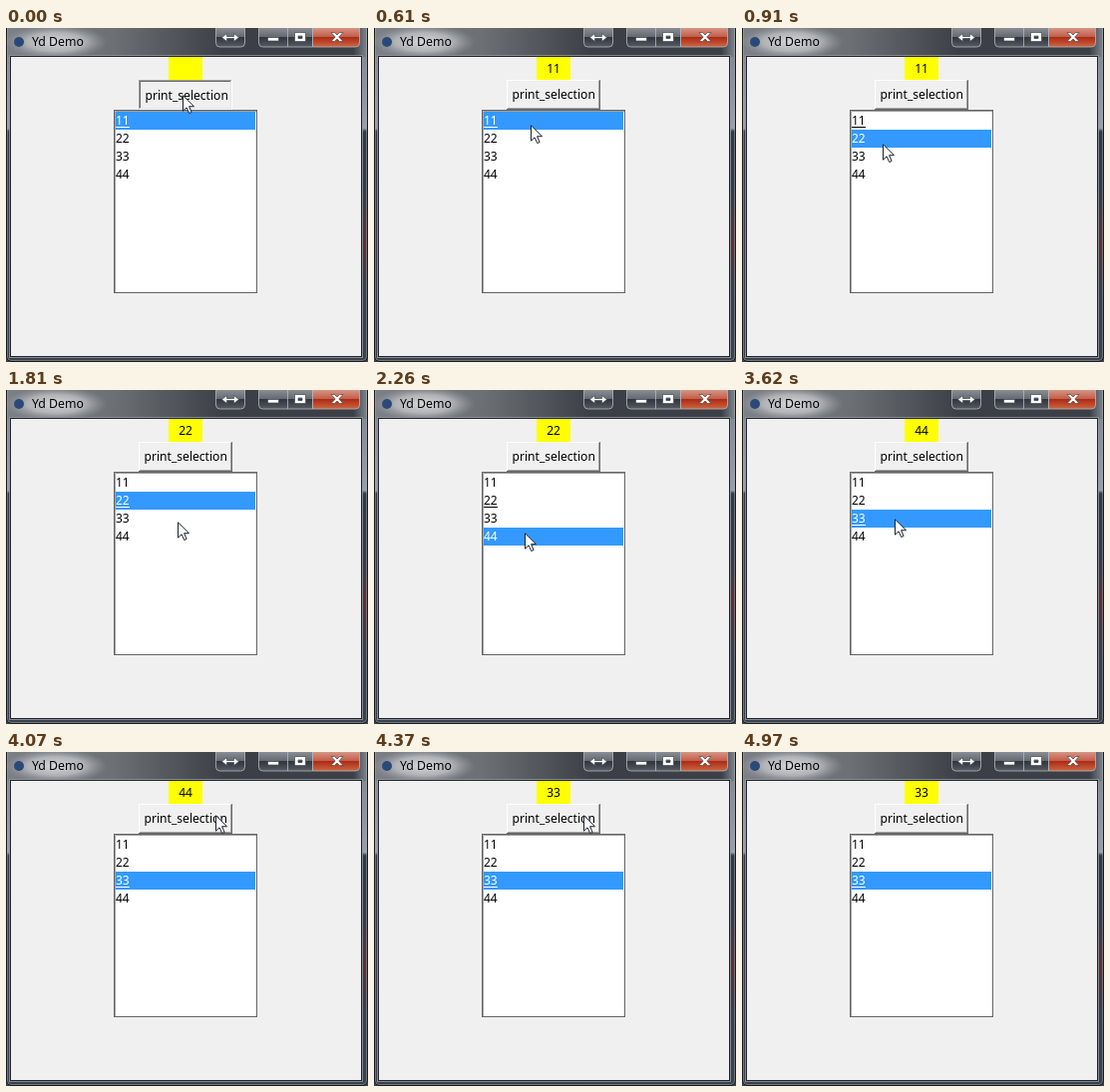
Animation, 363 px wide and 335 px high, one loop 5120 ms. Source, as an HTML page:

```html
<!DOCTYPE html>
<html lang="en">
<head>
<meta charset="utf-8">
<title>Listbox demo</title>
<style>
  html, body { margin: 0; width: 100%; height: 100%; overflow: hidden; }
  svg { display: block; width: 363px; height: 335px; font: 12px "Noto Sans", "Open Sans", sans-serif; }

  /* row: selected line, act: underlined line, lab: label entry */
  #app {
    --row: 0; --act: 0; --lab: 0;
    animation: row 5120ms step-end infinite, act 5120ms step-end infinite, lab 5120ms step-end infinite;
  }
  .row { transform: translateY(calc(var(--row) * 18px)); }
  .back { transform: translateY(calc(var(--row) * -18px)); }
  .act { transform: translateY(calc(var(--act) * 18px)); }
  .lab { transform: translateY(calc(var(--lab) * -30px)); }
  .up, .down, #cursor { animation: 5120ms step-end infinite; }
  .up { animation-name: up; }
  .down { animation-name: down; }
  #cursor { animation-name: move; }

  @keyframes row {
    0% { --row: 0; }
    17.77% { --row: 1; }
    44.13% { --row: 3; }
    67.77%, 100% { --row: 2; }
  }
  @keyframes act {
    0% { --act: 0; }
    20.7% { --act: 1; }
    47.06% { --act: 3; }
    70.7%, 100% { --act: 2; }
  }
  @keyframes lab {
    0% { --lab: 0; }
    2.92% { --lab: 1; }
    32.42% { --lab: 2; }
    55.85% { --lab: 3; }
    85.35%, 100% { --lab: 4; }
  }
  @keyframes up {
    0%, 29.49%, 82.42% { visibility: hidden; }
    2.92%, 32.42%, 85.35%, 100% { visibility: visible; }
  }
  @keyframes down {
    0%, 29.49%, 82.42% { visibility: visible; }
    2.92%, 32.42%, 85.35%, 100% { visibility: hidden; }
  }
  @keyframes move {
    0% { transform: translate(177px, 67px); }
    8.98% { transform: translate(173px, 75px); }
    11.91% { transform: translate(157px, 97px); }
    14.84% { transform: translate(143px, 114px); }
    17.77% { transform: translate(141px, 116px); }
    23.63% { transform: translate(158px, 97px); }
    26.56% { transform: translate(180px, 65px); }
    32.42% { transform: translate(181px, 68px); }
    35.35% { transform: translate(172px, 132px); }
    38.28% { transform: translate(158px, 141px); }
    41.21% { transform: translate(151px, 143px); }
    47.06% { transform: translate(176px, 106px); }
    50% { transform: translate(193px, 78px); }
    52.92% { transform: translate(198px, 68px); }
    61.91% { transform: translate(178px, 106px); }
    64.84% { transform: translate(159px, 125px); }
    67.77% { transform: translate(153px, 129px); }
    73.63% { transform: translate(171px, 108px); }
    76.56% { transform: translate(196px, 79px); }
    79.49% { transform: translate(210px, 63px); }
    88.28% { transform: translate(222px, 96px); }
    91.21% { transform: translate(255px, 180px); }
    94.14% { transform: translate(315px, 322px); }
    97.06%, 100% { transform: translate(400px, 400px); }
  }
</style>
</head>
<body>
<svg viewBox="0 0 363 335">
  <defs>
    <linearGradient id="bar">
      <stop offset="0" stop-color="#7b8086"/>
      <stop offset=".3" stop-color="#6c7075"/>
      <stop offset=".6" stop-color="#3c3f45"/>
      <stop offset=".96" stop-color="#3b3f47"/>
      <stop offset="1" stop-color="#868c94"/>
    </linearGradient>
    <linearGradient id="side" x2="0" y2="1">
      <stop offset="0" stop-color="#7b8189"/>
      <stop offset=".3" stop-color="#9aa0a8"/>
      <stop offset=".31" stop-color="#343941"/>
      <stop offset="1" stop-color="#3a424d"/>
    </linearGradient>
    <linearGradient id="warm" x2="0" y2="1">
      <stop offset="0" stop-color="#5c3038" stop-opacity="0"/>
      <stop offset=".5" stop-color="#5c3038"/>
      <stop offset="1" stop-color="#5c3038" stop-opacity="0"/>
    </linearGradient>
    <linearGradient id="glass" x2="0" y2="1">
      <stop offset="0" stop-color="#8d9198"/>
      <stop offset=".48" stop-color="#666b73"/>
      <stop offset=".5" stop-color="#30343b"/>
      <stop offset="1" stop-color="#555b64"/>
    </linearGradient>
    <linearGradient id="red" x2="0" y2="1">
      <stop offset="0" stop-color="#d99a8c"/>
      <stop offset=".48" stop-color="#c35f4c"/>
      <stop offset=".5" stop-color="#a92a15"/>
      <stop offset="1" stop-color="#cf6440"/>
    </linearGradient>
    <radialGradient id="halo">
      <stop offset="0" stop-color="#d6d8da"/>
      <stop offset=".55" stop-color="#c4c6c9" stop-opacity=".75"/>
      <stop offset="1" stop-color="#a0a3a8" stop-opacity="0"/>
    </radialGradient>
    <clipPath id="line"><rect x="110" y="84" width="140" height="18"/></clipPath>
    <clipPath id="tag"><rect x="163" y="29" width="34" height="23"/></clipPath>
    <g id="rows">
      <text x="110" y="97">11</text>
      <text x="110" y="115">22</text>
      <text x="110" y="133">33</text>
      <text x="110" y="151">44</text>
      <rect class="act" x="110" y="99" width="14" height="1"/>
    </g>
  </defs>

  <!-- window frame -->
  <rect width="363" height="335" fill="url(#side)"/>
  <rect width="363" height="29" fill="url(#bar)"/>
  <rect x="357" y="170" width="5" height="90" fill="url(#warm)"/>
  <rect x=".5" y="-4" width="362" height="338.5" rx="5" fill="none" stroke="#17191d"/>
  <rect x="1.5" y="-4" width="360" height="337.5" rx="4" fill="none" stroke="#a5acb5" stroke-opacity=".5"/>
  <ellipse cx="50" cy="14" rx="52" ry="17" fill="url(#halo)"/>
  <circle cx="13" cy="14" r="5" fill="#294a78"/>
  <text x="26" y="18" font-size="12.3">Yd Demo</text>

  <!-- caption buttons -->
  <g stroke="#b4b8bd" stroke-opacity=".8">
    <path d="M210.5 -1V15q0 4 4 4H235.5q4 0 4-4V-1z" fill="url(#glass)"/>
    <path d="M253.5 -1V15q0 4 4 4H307.5V-1z" fill="url(#glass)"/>
    <path d="M307.5 -1V19H350.5q4 0 4-4V-1z" fill="url(#red)"/>
    <path d="M282.5 0V19"/>
  </g>
  <g fill="#fff" stroke="#43474e" stroke-width=".7">
    <path d="M216.5 9.5l5-4v3h7v-3l5 4-5 4v-3h-7v3z"/>
    <rect x="262.5" y="9.5" width="11" height="3.5"/>
    <path d="M289.5 4.5h11v9h-11zM293 8v2.5h4V8z" fill-rule="evenodd"/>
    <path d="M326 4.5h3.5l2.5 2.5 2.5-2.5h3.5l-4.2 4.5 4.2 4.5h-3.5l-2.5-2.5-2.5 2.5H326l4.2-4.5z"/>
  </g>

  <rect x="3.5" y="27.5" width="354" height="303" fill="#22262c" stroke="#a9afb7" stroke-opacity=".7"/>
  <rect x="5" y="29" width="351" height="300" fill="#f0f0f0"/>

  <g id="app">
    <rect x="163" y="29" width="34" height="23" fill="#ff0"/>
    <g clip-path="url(#tag)">
      <g class="lab" text-anchor="middle">
        <text x="180" y="75">11</text>
        <text x="180" y="105">22</text>
        <text x="180" y="135">44</text>
        <text x="180" y="165">33</text>
      </g>
    </g>

    <!-- push button, raised and pressed -->
    <g class="up">
      <path d="M133 82V52H227V82z" fill="#696969"/>
      <path d="M133 81V52H226V81z" fill="#fff"/>
      <path d="M134 81V53H226V81z" fill="#a0a0a0"/>
      <path d="M134 80V53H225V80z" fill="#f0f0f0"/>
      <text x="138.5" y="71" font-size="12.1">print_selection</text>
    </g>
    <g class="down">
      <path d="M133 82V52H227V82z" fill="#fff"/>
      <path d="M133 81V52H226V81z" fill="#a0a0a0"/>
      <path d="M134 81V53H226V81z" fill="#e3e3e3"/>
      <path d="M134 80V53H225V80z" fill="#696969"/>
      <path d="M135 80V54H225V80z" fill="#f0f0f0"/>
      <text x="139.5" y="72" font-size="12.1">print_selection</text>
    </g>

    <!-- list; the selection is a moving window onto a white copy of the rows -->
    <rect x="108.5" y="82.5" width="143" height="183" fill="#fff" stroke="#646464"/>
    <path d="M109.5 265V83.5H251" fill="none" stroke="#a0a0a0"/>
    <use href="#rows"/>
    <g class="row" fill="#fff">
      <g clip-path="url(#line)">
        <rect x="110" y="84" width="140" height="18" fill="#39f"/>
        <g class="back"><use href="#rows"/></g>
      </g>
    </g>
  </g>

  <g id="cursor">
    <path d="M.5 .8V16.2L4.1 12.8 6.7 18.5 9.1 17.5 6.6 11.7H11.5z" fill="#fff" stroke="#1c2030"/>
  </g>
</svg>
</body>
</html>
```
